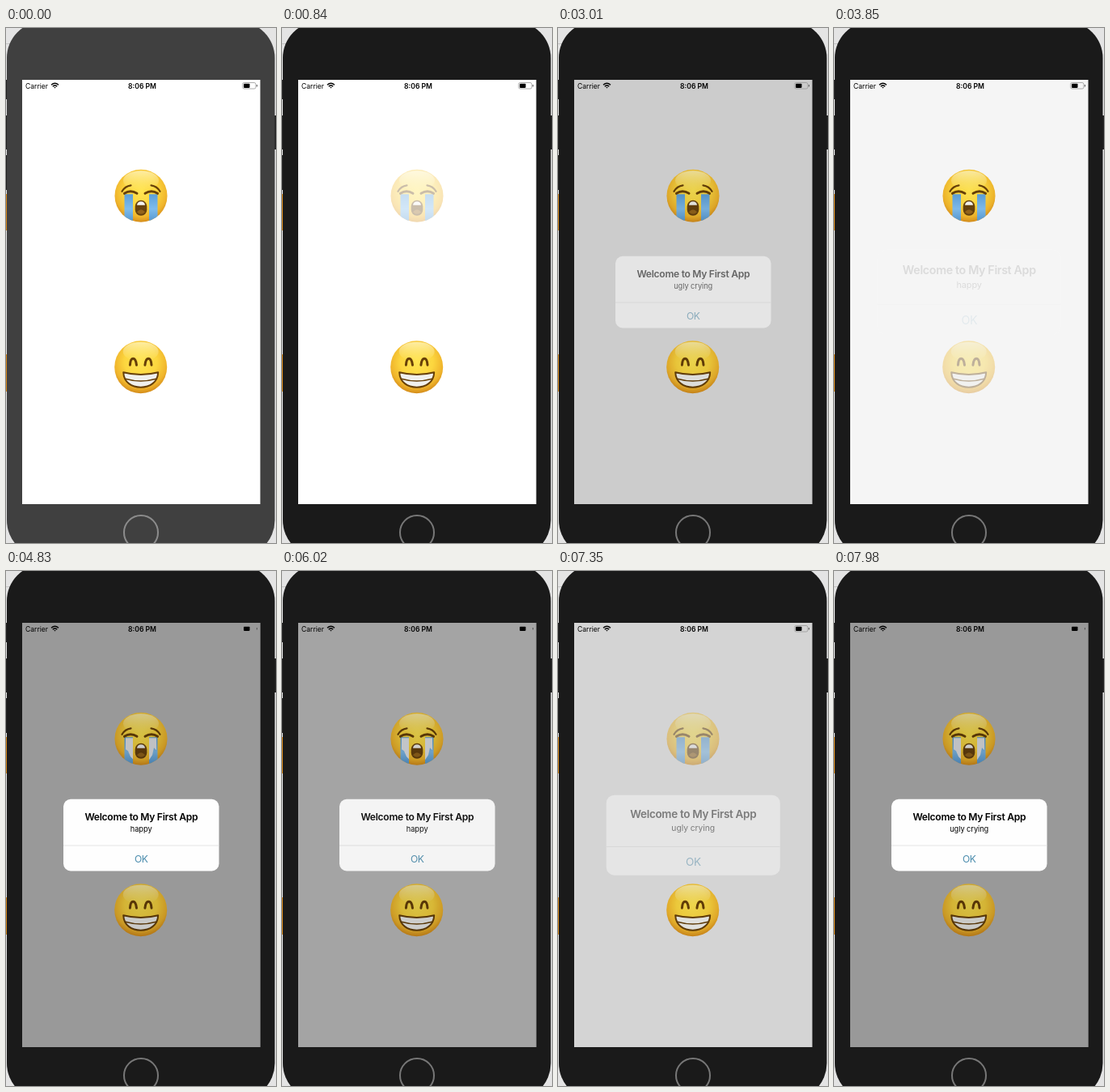
These frames come from a looping animation (334 px wide and 636 px high, 8 s). An HTML page:

```html
<!DOCTYPE html>
<html lang="en">
<head>
<meta charset="utf-8">
<title>Alert demo</title>
<style>
  html, body { margin: 0; width: 100%; height: 100%; overflow: hidden; background: #e4e4e4; }
  svg { display: block; width: 100vw; height: 100vh; }
  text { font-family: Inter, "Liberation Sans", sans-serif; text-anchor: middle; }
  .line { fill: none; stroke: #674008; stroke-linecap: round; }
</style>
</head>
<body>
<svg viewBox="0 0 334 636">
  <defs>
    <radialGradient id="skin" cx=".5" cy=".4" r=".62">
      <stop offset="0" stop-color="#ffe552"/>
      <stop offset=".5" stop-color="#fcd63f"/>
      <stop offset=".8" stop-color="#f0b52c"/>
      <stop offset="1" stop-color="#cf8417"/>
    </radialGradient>
    <linearGradient id="shine" x2="0" y2="1">
      <stop offset="0" stop-color="#fff8c8" stop-opacity=".75"/>
      <stop offset="1" stop-color="#fff0a0" stop-opacity="0"/>
    </linearGradient>
    <linearGradient id="tear" x2="0" y2="1">
      <stop offset="0" stop-color="#5c9fd8"/>
      <stop offset=".5" stop-color="#7fbcec"/>
      <stop offset="1" stop-color="#4f92cc"/>
    </linearGradient>
    <clipPath id="face"><circle r="32.5"/></clipPath>
    <g id="head">
      <circle r="32.5" fill="url(#skin)"/>
      <ellipse cy="-19" rx="22" ry="12" fill="url(#shine)"/>
    </g>
  </defs>

  <!-- surroundings and phone body -->
  <rect width="334" height="636" fill="#e4e4e4"/>
  <path d="M0 19.5H8" stroke="#c4c4c4"/>
  <path d="M.5 205V250M.5 403V449" stroke="#d98a1c" stroke-width="2"/>
  <path d="M.5 64V88M.5 108V150M.5 157V200M333 108V150" stroke="#222" stroke-width="2"/>
  <rect id="body" x="1" y="-8" width="331.5" height="661" rx="45"/>
  <circle id="home" cx="167" cy="623" r="21" fill="none" stroke-width="2"/>

  <!-- screen -->
  <rect x="20" y="64" width="294.5" height="524" fill="#fff"/>
  <rect id="dim" x="20" y="64" width="294.5" height="524"/>
  <g font-size="8.55">
    <text x="38" y="74.5">Carrier</text>
    <text x="168.5" y="74.5" font-weight="600">8:06 PM</text>
  </g>
  <g fill="none" stroke="#000" stroke-width="1.5">
    <path d="M56 70.2Q60.5 66.4 65 70.2M57.8 72.2Q60.5 69.8 63.2 72.2"/>
    <path d="M59.2 73L60.5 74.6L61.8 73Z" fill="#000" stroke="none"/>
  </g>
  <rect x="294" y="68.7" width="7.5" height="5.2" rx=".8"/>
  <rect id="battery" x="292.7" y="67.5" width="16.2" height="7.5" rx="1.8" fill="none" stroke="#999" stroke-width=".8"/>
  <path d="M310.4 70V72.5" stroke="#555"/>

  <g id="cry" transform="translate(167 207.3)">
    <use href="#head"/>
    <g clip-path="url(#face)">
      <path d="M-20.5 -2H-10V34H-20.5ZM10 -2H20.5V34H10Z" fill="url(#tear)"/>
      <path id="pale" d="M-19 -1H-10V25L-13 22L-16 15L-19 13ZM10 -1H19V14L16 11L14 20L10 26Z" fill="#e3e6ea"/>
    </g>
    <g id="cryEye">
      <path class="line" stroke-width="2.2" d="M-23.5 -5.5Q-20 -12 -12.5 -13"/>
      <path class="line" stroke-width="3" d="M-20.5 -3Q-13 -8 -5 -3"/>
    </g>
    <use href="#cryEye" transform="scale(-1 1)"/>
    <rect x="-7.3" y="5.5" width="14.6" height="19" rx="7.2" fill="#67420e"/>
    <path d="M-5 11.5Q-4.5 7 0 7Q4.5 7 5 11.5Z" fill="#f4f4f0"/>
    <path d="M-5 20Q0 14 5 20Q0 25 -5 20Z" fill="#94641b"/>
    <circle class="shade" r="32.5"/>
  </g>

  <g id="grin" transform="translate(166.7 418.7)">
    <use href="#head"/>
    <path class="line" stroke-width="3" d="M-13.3 -2.5C-12.5 -13 -6.5 -13 -5.2 -2.5M5.2 -2.5C6.5 -13 12.5 -13 13.3 -2.5"/>
    <path d="M-21.5 6.5Q0 12 21.5 6.5C21 19 11 25 0 25S-21 19 -21.5 6.5Z" fill="#f0f0ed" stroke="#674008" stroke-width="2" stroke-linejoin="round"/>
    <path class="line" stroke-width="1.5" d="M-19 14.5Q0 20 19 14.5"/>
    <circle class="shade" r="32.5"/>
  </g>

  <g id="alert">
    <rect x="71" y="281.8" width="192.5" height="88.7" rx="9" fill="#fefefe"/>
    <path d="M71 339H263.5" stroke="#dcdcdc" stroke-width=".8"/>
    <text x="167.3" y="307.5" font-size="12.1" font-weight="600" letter-spacing="-.29">Welcome to My First App</text>
    <text id="message" x="167.2" y="321.8" font-size="9.26" letter-spacing="-.06"></text>
    <text x="167.3" y="359.6" font-size="12.1" letter-spacing="-.29" fill="#4a8cad">OK</text>
  </g>
</svg>
<script>
  const LOOP = 8000, STEP = 70, FOCUS = 560;
  const $ = id => document.getElementById(id);
  const shades = document.querySelectorAll('.shade');

  // Each tap on a face opens an alert; "close" is when it starts to fade.
  const taps = [
    { face: 'cry', text: 'ugly crying', press: 560, close: 2835 },
    { face: 'grin', text: 'happy', press: 3500, close: 5950 },
    { face: 'cry', text: 'ugly crying', press: 6930, close: Infinity }
  ];

  const ramp = (t, start, length) => Math.min(1, Math.max(0, (t - start) / length));
  const easeOut = p => 1 - (1 - p) ** 2;
  const easeInOut = p => p * p * (3 - 2 * p);

  function draw(t) {
    const tap = taps.filter(a => a.press <= t).pop() || taps[0];
    const opened = easeOut(ramp(t, tap.press + 330, 380));
    const shown = opened * (1 - easeInOut(ramp(t, tap.close, 350)));
    const dim = 0.4 * shown;

    for (const name of ['cry', 'grin']) {
      const pressed = ramp(t, tap.press - STEP, STEP) * (1 - ramp(t, tap.press + 330, 350));
      $(name).setAttribute('opacity', name === tap.face ? 1 - 0.66 * pressed : 1);
    }

    $('alert').setAttribute('opacity', shown);
    const scale = 1.2 - 0.2 * opened;
    $('alert').setAttribute('transform',
      `translate(167.3 326) scale(${scale}) translate(-167.3 -326)`);
    $('message').textContent = tap.text;

    $('dim').setAttribute('opacity', dim);
    shades.forEach(s => s.setAttribute('opacity', dim * 0.4));
    const deep = dim > 0.3;
    $('pale').setAttribute('opacity', deep ? 1 : 0);
    $('battery').setAttribute('opacity', deep ? 0 : 1);

    const focused = t >= FOCUS;
    $('body').setAttribute('fill', focused ? '#1a1a1a' : '#404040');
    $('home').setAttribute('stroke', focused ? '#777' : '#8c8c8c');
  }

  const start = performance.now();
  function tick() {
    const t = (performance.now() - start) % LOOP;
    draw(Math.floor(t / STEP) * STEP);
    requestAnimationFrame(tick);
  }
  draw(0);
  requestAnimationFrame(tick);
</script>
</body>
</html>
```
